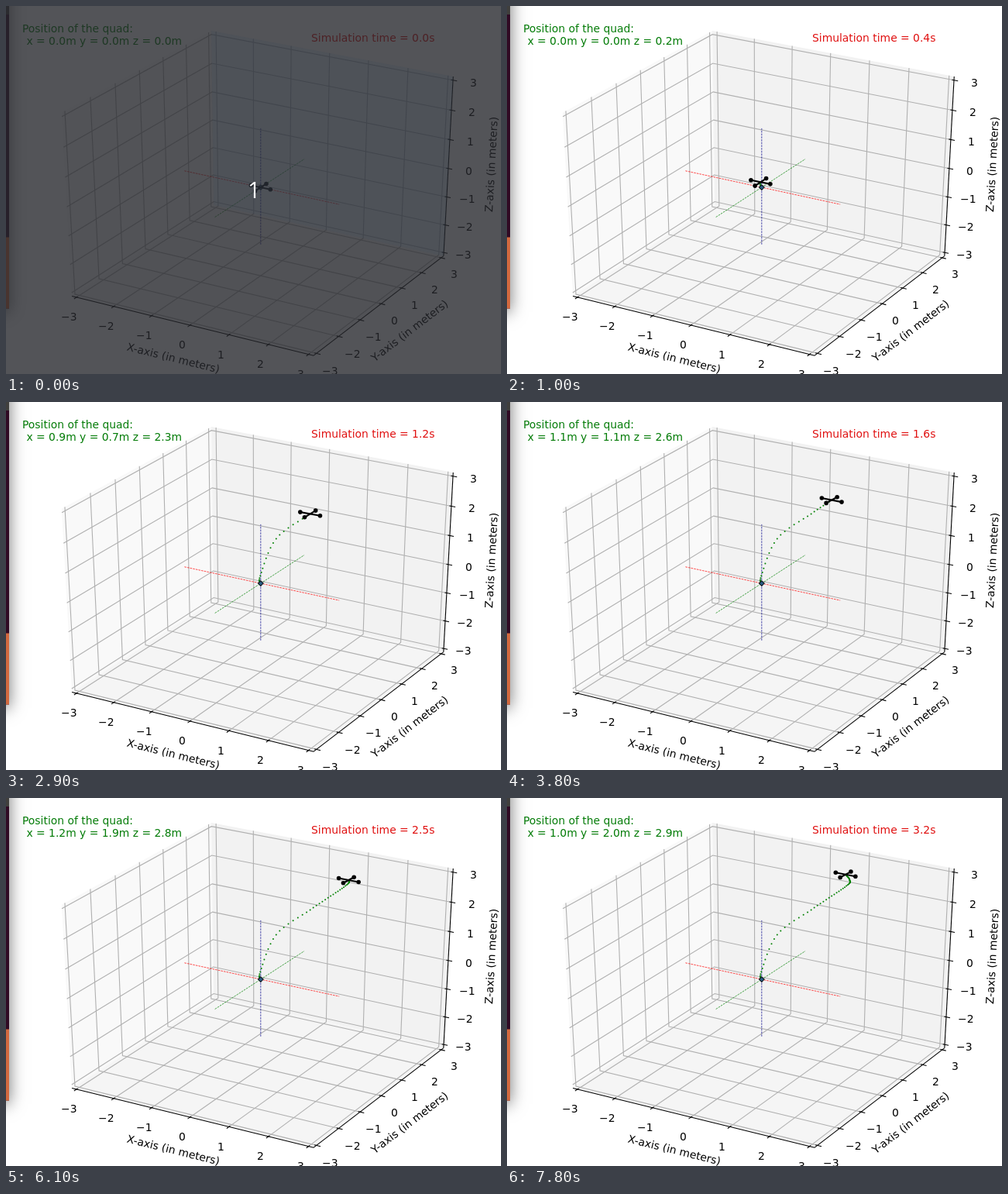
Recreate the animation shown at these times as an HTML page with a canvas. Size 639 px wide and 475 px high, loop 8 s.

```html
<!DOCTYPE html>
<html lang="en">
<head>
<meta charset="utf-8">
<title>Quadcopter flight</title>
<style>
html, body { margin: 0; width: 100%; height: 100%; overflow: hidden; background: #fff; }
canvas { display: block; }
</style>
</head>
<body>
<canvas id="stage" width="639" height="475"></canvas>
<script>
const ctx = document.getElementById('stage').getContext('2d');
const LOOP = 8000, DT = 0.05, H = 3.125, ARM = 0.25;
const REFRESH = 1.733; // mean gap between plot updates, in tenths of a second
const FONT = '13.89px "DejaVu Sans", sans-serif';
const GREEN = '#047c08', RED = '#e01010';
const UNITS = [-3, -2, -1, 0, 1, 2, 3];

// [seconds, simulated seconds]
const CLOCK = [[0.1, 0], [1.1, 0.4], [1.7, 0.8], [2.9, 1.2], [7.8, 3.2]];

// Waypoints: [simulated seconds, x, y, z]
const FLIGHT = [[-0.4, 0, 0, 0], [0, 0, 0, 0], [0.4, -0.01, 0, 0.26], [0.8, 0.28, 0.2, 1.5],
  [1.2, 0.87, 0.67, 2.27], [1.9, 1.26, 1.56, 2.76], [2.5, 1.17, 1.88, 2.79], [3.2, 1, 2, 2.88]];

// Simulated time of the latest plot update, in whole steps
function simTime(ms) {
  const updates = Math.floor((Math.floor(ms / 100) + 0.5) / REFRESH);
  const t = Math.max(Math.round(updates * REFRESH) / 10, CLOCK[0][0]);
  const next = Math.max(CLOCK.findIndex(row => row[0] >= t), 1);
  const [t0, s0] = CLOCK[next - 1], [t1, s1] = CLOCK[next];
  const sim = s0 + (s1 - s0) * (t - t0) / (t1 - t0);
  return Math.floor(sim / DT + 1e-6) * DT;
}

// Smooth curve through the waypoints
function position(t) {
  const last = FLIGHT.length - 1;
  let i = 1;
  while (i < last - 1 && t > FLIGHT[i + 1][0]) i++;
  const a = FLIGHT[i], b = FLIGHT[i + 1], span = b[0] - a[0], s = (t - a[0]) / span;
  const before = FLIGHT[i - 1], after = FLIGHT[Math.min(i + 2, last)];
  return [1, 2, 3].map(k => {
    const m0 = (b[k] - before[k]) / (b[0] - before[0]) * span;
    const m1 = (after[k] - a[k]) / (after[0] - a[0]) * span;
    const d = b[k] - a[k];
    return a[k] + s * (m0 + s * (3 * d - 2 * m0 - m1 + s * (m0 + m1 - 2 * d)));
  });
}

// Perspective view at azimuth -60, elevation 30
function project([x, y, z]) {
  const depth = 10 - (0.433 * x - 0.75 * y + 0.5 * z) / 6;
  return [328.8 + 3459 / 6 * (0.866 * x + 0.5 * y) / depth,
    234.1 - 2595 / 6 * (-0.25 * x + 0.433 * y + 0.866 * z) / depth];
}

function trace(points) {
  ctx.beginPath();
  points.forEach(p => ctx.lineTo(...project(p)));
}
function line(points, color, width, dash = []) {
  trace(points);
  ctx.strokeStyle = color;
  ctx.lineWidth = width;
  ctx.setLineDash(dash);
  ctx.stroke();
}
function fill(points, color) {
  trace(points);
  ctx.fillStyle = color;
  ctx.fill();
}
function dot(point, radius, color) {
  ctx.beginPath();
  ctx.arc(...project(point), radius, 0, 7);
  ctx.fillStyle = color;
  ctx.fill();
}
function text(string, x, y, color = '#000', font = FONT) {
  ctx.font = font;
  ctx.fillStyle = color;
  ctx.fillText(string, x, y);
}
function centeredText(string, x, y, color, font = FONT) {
  ctx.font = font;
  text(string, Math.round(x - ctx.measureText(string).width / 2), Math.round(y), color, font);
}

const BACK = [[-H, H, -H], [H, H, -H], [H, H, H], [-H, H, H]];
// Each axis: point at value v moved outwards by d, tick end moved along one direction
const AXES = [
  { name: 'X', at: (v, d = 0) => [v, -H - d, -H - d], tick: (v, d) => [v, -H - d, -H],
    grid: v => [[v, -H, -H], [v, H, -H], [v, H, H]] },
  { name: 'Y', at: (v, d = 0) => [H + d, v, -H - d], tick: (v, d) => [H + d, v, -H],
    grid: v => [[H, v, -H], [-H, v, -H], [-H, v, H]] },
  { name: 'Z', at: (v, d = 0) => [H + d, H + d, v], tick: (v, d) => [H + d, H, v],
    grid: v => [[-H, -H, v], [-H, H, v], [H, H, v]] }];

function drawAxis({ name, at, tick }) {
  line([at(-H), at(H)], '#000', 1.1);
  for (const v of UNITS) {
    line([tick(v, -0.05), tick(v, 0.1)], '#000', 1.1);
    const [x, y] = project(at(v, 0.342));
    centeredText(String(v).replace('-', '\u2212'), x, y + 10.5);
  }
  const [x0, y0] = project(at(-H)), [x1, y1] = project(at(H));
  ctx.save();
  ctx.translate(...project(at(0, 0.744)));
  ctx.rotate(Math.atan2(y1 - y0, x1 - x0));
  centeredText(name + '-axis (in meters)', 0, 4);
  ctx.restore();
}

function drawPlot() {
  fill([[-H, -H, -H], [-H, H, -H], [-H, H, H], [-H, -H, H]], '#f9f9f9');
  fill(BACK, '#f2f2f2');
  fill([[-H, -H, -H], [H, -H, -H], [H, H, -H], [-H, H, -H]], '#f5f5f5');
  for (const axis of AXES) UNITS.forEach(v => line(axis.grid(v), '#b0b0b0', 1.1));
  AXES.forEach(drawAxis);
  ['#f00', '#008000', '#00008b'].forEach((color, k) => {
    const ends = [-2, 2].map(v => [0, 1, 2].map(j => j === k ? v : 0));
    line(ends, color, 0.7, [2.6, 1.1]);
  });
}

function drawOrigin() {
  const [x, y] = project([0, 0, 0]), r = 3.3;
  ctx.beginPath();
  [[0, -r], [r, 0], [0, r], [-r, 0]].forEach(([dx, dy]) => ctx.lineTo(x + dx, y + dy));
  ctx.closePath();
  ctx.fillStyle = '#2a5f86';
  ctx.fill();
  ctx.strokeStyle = '#101820';
  ctx.lineWidth = 1.1;
  ctx.setLineDash([]);
  ctx.stroke();
}

function drawQuad(sim) {
  for (let i = 0; i * DT < sim - 0.01; i++) dot(position(i * DT), 1, '#008000');
  drawOrigin();

  // The body leans while it accelerates sideways, then levels out
  const [x, y, z] = position(sim);
  const lean = Math.exp(-(((sim - 0.8) / 0.3) ** 2));
  const liftX = 0.04 * lean, liftY = 0.07 * lean - 0.015 * Math.min(1, sim);
  const arms = [
    [-1, 1].map(s => [x + s * ARM, y, z + s * liftX]),
    [-1, 1].map(s => [x, y + s * ARM, z + s * liftY])];
  for (const arm of arms) {
    line(arm, '#000', 2.1);
    arm.forEach(end => dot(end, 2.8, '#000'));
  }

  const [px, py, pz] = [x, y, z].map(v => Math.abs(v).toFixed(1));
  text('Position of the quad:', 21, 34, GREEN);
  text(` x = ${px}m y = ${py}m z = ${pz}m`, 22, 50, GREEN);
  text(`Simulation time = ${sim.toFixed(1)}s`, 394, 46, RED);
}

function drawWindowEdge() {
  ctx.save();
  ctx.shadowColor = 'rgba(0,0,0,.55)';
  ctx.shadowBlur = 20;
  ctx.shadowOffsetY = 4;
  ctx.fillStyle = '#300a24';
  ctx.fillRect(-100, -60, 104, 450.5);
  ctx.restore();
  ctx.fillStyle = '#403f3d';
  ctx.fillRect(0, 0, 4, 11);
  ctx.fillStyle = '#d2693f';
  ctx.fillRect(0, 298.5, 4, 92);
}

function drawCountdown() {
  ctx.fillStyle = 'rgba(38,39,44,.79)';
  ctx.fillRect(0, 0, 639, 475);
  fill(BACK, 'rgba(60,90,120,.1)');
  centeredText('1', 320, 248, '#fff', '29px "Open Sans", sans-serif');
}

function draw(ms) {
  ctx.fillStyle = '#fff';
  ctx.fillRect(0, 0, 639, 475);
  drawPlot();
  drawQuad(simTime(ms));
  drawWindowEdge();
  if (ms < 100) drawCountdown();
}

const start = performance.now();
function tick() {
  draw((performance.now() - start) % LOOP);
  requestAnimationFrame(tick);
}
tick();
</script>
</body>
</html>
```
